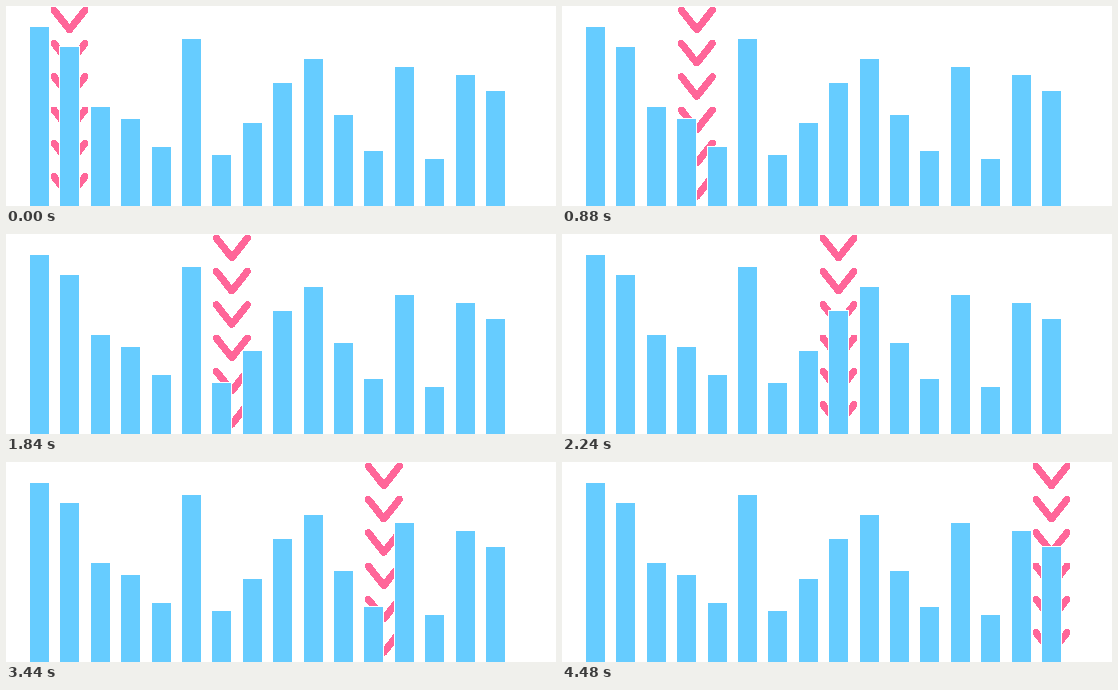
A matplotlib script that plays this animation: 550x200 px, repeating every 5.2 s.

```python
import numpy as np
import matplotlib.pyplot as plt
from matplotlib.animation import FuncAnimation
from matplotlib.patches import Rectangle

W, H, DPI = 550, 200, 100
STEP_MS, FRAMES = 40, 130
BLUE, PINK = "#66CCFF", "#FF6699"

VALUES = [45, 40, 25, 22, 15, 42, 13, 21, 31, 37, 23, 14, 35, 12, 33, 29]
UNIT, BAR_W = 4, 19          # pixels per value, bar width
CYCLE, MOVE = 8, 3           # frames per bar, of which the last ones move
ROWS, PITCH = 6, 33.3

fig = plt.figure(figsize=(W / DPI, H / DPI), dpi=DPI, facecolor="white")
ax = fig.add_axes([0, 0, 1, 1])
ax.set_xlim(0, W)
ax.set_ylim(H, 0)
ax.axis("off")


def bar_left(k):
    return round(24 + 30.4 * k)


def box(x, y, w, h, color):
    ax.add_patch(Rectangle((x, y), w, h, fc=color, lw=0,
                           antialiased=False, zorder=2))


for k, value in enumerate(VALUES):
    x, h = bar_left(k), UNIT * value
    box(x - 1, H - h, BAR_W + 2, h, "white")
    box(x, H - h + 1, BAR_W, h - 1, BLUE)

ARM_X = np.array([-15.6, 0, 15.6])
ARM_Y = np.array([4, 23.7, 4])
chevrons = [ax.plot([], [], color=PINK, lw=5.8 * 72 / DPI, zorder=1,
                    solid_capstyle="round", solid_joinstyle="round",
                    antialiased=False)[0]
            for _ in range(ROWS)]


def marker_x(i):
    n, part = divmod(i, CYCLE)
    # the first move takes the whole cycle, later ones only its end
    move = CYCLE if n == 0 else MOVE
    s = max(0, part - (CYCLE - move)) / move
    last = len(VALUES) - 1
    a, b = (bar_left(min(k, last)) for k in (n + 1, n + 2))
    return a + (b - a) * s + BAR_W / 2


def draw(i):
    x = marker_x(i)
    for r, line in enumerate(chevrons):
        line.set_data(x + ARM_X, ARM_Y + r * PITCH)
    return chevrons


anim = FuncAnimation(fig, draw, frames=FRAMES, interval=STEP_MS,
                     repeat=True, repeat_delay=0, blit=False)
plt.show()
```
